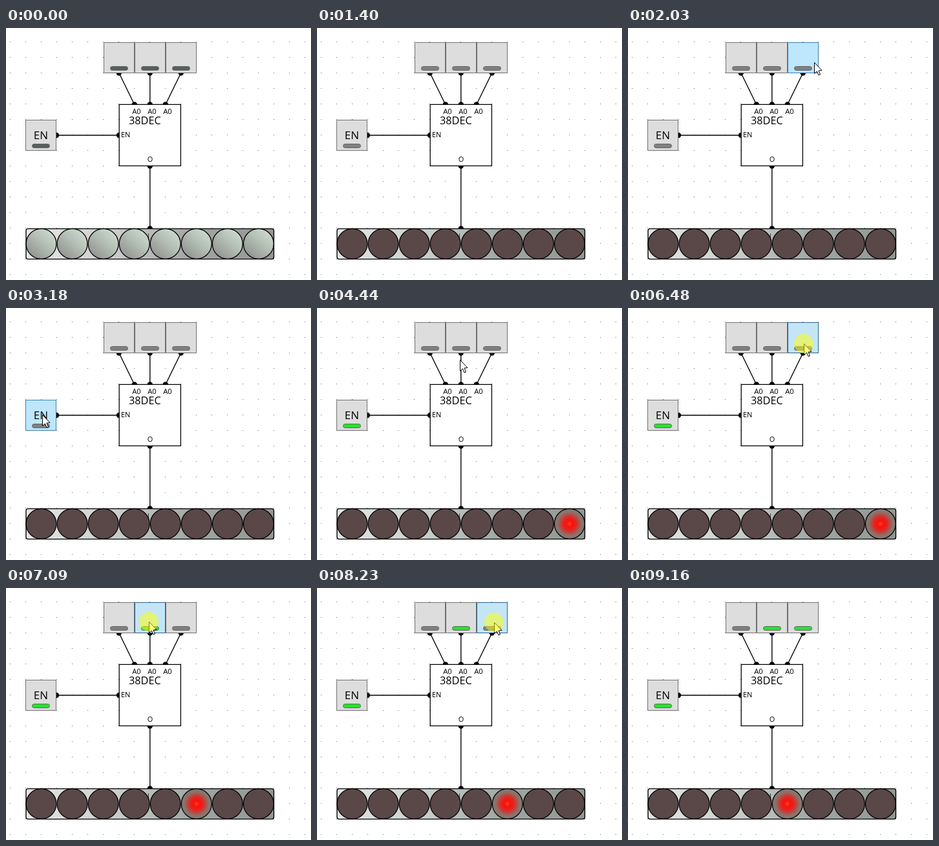
These frames come from a looping animation (472x390 px, 9710 ms). An HTML page with a canvas:

```html
<!DOCTYPE html>
<html lang="en">
<head>
<meta charset="utf-8">
<title>3-to-8 decoder</title>
<style>
html, body { margin: 0; width: 100%; height: 100%; overflow: hidden; background: #fff; }
canvas { display: block; }
</style>
</head>
<body>
<canvas id="stage" width="472" height="390"></canvas>
<script>
const ctx = document.getElementById('stage').getContext('2d');
const LOOP = 9710, STEP = 77.5, POWER = 1250, LAMPS = 1400;
const SHOW = 1450, HIDE = 9100, PRESS = 75, RELEASE = 225;

// Pointer glides: from, to, x, y
const glides = [
  [1400, 1790, 288, 53], [2260, 2580, 328, 82], [2640, 3080, 56, 165], [3480, 3800, 306, 185],
  [4030, 4415, 221, 80], [4440, 4680, 273, 78], [4750, 5060, 300, 49], [5130, 5290, 272, 52],
  [5600, 5810, 319, 87], [5920, 6225, 272, 55], [6520, 6690, 300, 92], [6700, 6975, 221, 52],
  [7165, 7520, 417, 111], [7615, 7950, 274, 53], [8390, 8790, 454, 340], [8790, 9070, 418, 379]
];

// Clicks: time, button
const clicks = [[3260, 3], [5365, 2], [6300, 2], [7010, 1], [8165, 2]];
const buttons = [[151, 22, ''], [199, 22, ''], [247, 22, ''], [30, 142, 'EN']];

function pointerAt(t) {
  let x = 372, y = 277;
  for (const [from, to, tx, ty] of glides) {
    const k = Math.min(1, Math.max(0, (t - from) / (to - from)));
    const e = k * k * (3 - 2 * k);
    x += (tx - x) * e;
    y += (ty - y) * e;
  }
  return [Math.round(x), Math.round(y)];
}

function paint(fill, stroke, width = 1) {
  if (fill) { ctx.fillStyle = fill; ctx.fill(); }
  if (stroke) { ctx.strokeStyle = stroke; ctx.lineWidth = width; ctx.stroke(); }
}

function box(x, y, w, h, r, ...style) {
  ctx.beginPath();
  ctx.roundRect(x, y, w, h, r);
  paint(...style);
}

function disc(x, y, r, ...style) {
  ctx.beginPath();
  ctx.arc(x, y, r, 0, Math.PI * 2);
  paint(...style);
}

function text(s, x, y, size, align = 'center', color = '#000') {
  ctx.font = size + 'px "Open Sans", "Noto Sans", sans-serif';
  ctx.textAlign = align;
  ctx.fillStyle = color;
  ctx.fillText(s, x, y);
}

function wire(x1, y1, x2, y2) {
  ctx.beginPath();
  ctx.moveTo(x1, y1);
  ctx.lineTo(x2, y2);
  paint(null, '#000', 1.4);
  disc(x1, y1, 4.2, '#000');
  disc(x2, y2, 4.2, '#000');
}

function blend(gradient, ...stops) {
  stops.forEach((c, i) => gradient.addColorStop(i / (stops.length - 1), c));
  return gradient;
}

function drawGrid() {
  ctx.fillStyle = '#666';
  for (let x = 6; x < 472; x += 24)
    for (let y = 21; y < 390; y += 24) ctx.fillRect(x, y, 1, 1);
}

function drawButton([x, y, label], running, on, hover, pressed) {
  const fill = pressed ? '#c4e5f6' : hover ? '#bee6fd' : '#ddd';
  const edge = pressed ? '#2c628b' : hover ? '#3c7fb1' : '#707070';
  box(x + .5, y + .5, 47, 47, 0, fill, edge);
  box(x + 10.5, y + 37.5, 27, 6, 3, !running ? '#56605a' : on ? '#24e52a' : '#808080', '#666');
  text(label, x + 24, y + 30, 17);
}

function drawLamps(running, lit) {
  const shades = running
    ? ['#e4e6e5', '#cdd2cf', '#a0a7a3', '#909792']
    : ['#e8e8e8', '#cfcfcf', '#a4a4a4', '#949494'];
  box(31, 310.6, 383.5, 47, 3, blend(ctx.createLinearGradient(31, 300, 414, 368), ...shades), '#000', 1.4);
  text('I', 220.5, 326, 11, 'center', '#333');
  for (let i = 0; i < 8; i++) {
    const x = 54.5 + i * 48.05, y = 334;
    let fill = '#5a4848';
    if (!running)
      fill = blend(ctx.createLinearGradient(x + 16, y - 18, x - 16, y + 18), '#cad9cb', '#b0bab1', '#929592');
    else if (i === lit)
      fill = blend(ctx.createRadialGradient(x, y, 0, x, y, 23.5),
        '#ff4020', '#f8120d', '#e8201c', '#b54a43', '#8c736c', '#807a74');
    disc(x, y, 23.4, fill, '#000', 1.3);
  }
}

function drawPointer([x, y], pressed) {
  ctx.beginPath();
  [[0, 0], [0, 17], [4, 13.5], [6.5, 19.5], [9, 18.5], [6.5, 12.5], [11.5, 12]]
    .forEach(([dx, dy]) => ctx.lineTo(x + .5 + dx, y + .5 + dy));
  ctx.closePath();
  paint('#fff', '#000');
  if (pressed) disc(x, y, 15, 'rgba(255,255,0,.5)');
}

function draw(t) {
  const visible = t > SHOW && t < HIDE;
  const [px, py] = pointerAt(Math.floor(t / STEP) * STEP);
  const press = clicks.find(([c]) => t >= c && t < c + RELEASE);
  const on = buttons.map((b, i) => clicks.filter(([c, n]) => n === i && t >= c + PRESS).length % 2);
  const hover = visible ? buttons.findIndex(([x, y]) =>
    px >= x && px < x + 48 && py >= y && py < y + 48) : -1;

  ctx.fillStyle = '#fff';
  ctx.fillRect(0, 0, 472, 390);
  drawGrid();

  for (let i = 0; i < 3; i++) wire(174.8 + i * 48, 69.5, 198.8 + i * 24, 118.5);
  wire(78, 166, 175, 166);
  wire(222.8, 213.5, 222.8, 310.5);

  box(175.2, 118.4, 95.2, 95, 0, '#fff', '#000', 1.3);
  for (let i = 0; i < 3; i++) text('A0', 202 + i * 24, 133, 11.3);
  text('38DEC', 190, 149, 16.3, 'left');
  text('EN', 178, 169, 11, 'left');
  text('O', 223, 207, 11);

  // The highlighted button goes last so that its edge stays on top.
  const order = [0, 1, 2, 3].sort((a, b) => (a === hover) - (b === hover));
  for (const i of order)
    drawButton(buttons[i], t >= POWER, on[i], i === hover, press && press[1] === i);
  drawLamps(t >= LAMPS, on[3] ? 7 - (on[0] * 4 + on[1] * 2 + on[2]) : -1);
  if (visible) drawPointer([px, py], press);
}

const start = performance.now();
function tick(now) {
  draw(Math.max(0, now - start) % LOOP);
  requestAnimationFrame(tick);
}
tick(start);
</script>
</body>
</html>
```
